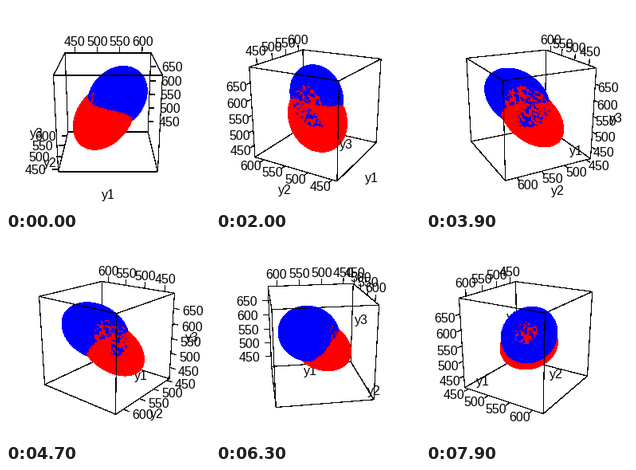
A matplotlib script for the animation above (8 s loop, 256 px wide and 256 px high).

```python
import itertools

import matplotlib.pyplot as plt
import numpy as np
from matplotlib.animation import FuncAnimation
from matplotlib.collections import LineCollection, PolyCollection

SIZE, FRAMES, STEP = 256, 80, 3.0        # pixels, frames, degrees per frame
FOCAL = SIZE / 2 / np.tan(np.radians(15))
DIST = 8.255
TILT = np.radians(20)
TICK, GAP, TITLE = 0.133, 0.28, 1.32     # in half box sides
DROP = 1.5                               # text offset in pixels
FONT = dict(family="Liberation Sans", size=16, ha="center", va="center")

fig = plt.figure(figsize=(SIZE / 72, SIZE / 72), dpi=72, facecolor="white")
ax = fig.add_axes([0, 0, 1, 1])
ax.set_xlim(0, SIZE)
ax.set_ylim(SIZE, 0)
ax.axis("off")


def rotate(p, angle):
    """Turn about the vertical axis and tilt; returns right, up, toward."""
    p = np.asarray(p, float)
    x, y, z = p[..., 0], p[..., 1], p[..., 2]
    c, s = np.cos(angle), np.sin(angle)
    right, away = c * x - s * y, s * x + c * y
    up = np.sin(TILT) * away + np.cos(TILT) * z
    toward = np.sin(TILT) * z - np.cos(TILT) * away
    return np.stack([right, up, toward], axis=-1)


def project(p, angle):
    v = rotate(p, angle)
    k = FOCAL / (DIST - v[..., 2])
    xy = np.stack([SIZE / 2 + k * v[..., 0], SIZE / 2 - k * v[..., 1]], axis=-1)
    return xy, v[..., 2]


def blob(center, spread, loose, rows=44, cols=88):
    """Quads, outward normals and looseness of an ellipsoidal mesh."""
    lat, lon = np.meshgrid(np.linspace(0, np.pi, rows + 1),
                           np.linspace(0, 2 * np.pi, cols + 1), indexing="ij")
    ball = np.stack([np.sin(lat) * np.cos(lon),
                     np.sin(lat) * np.sin(lon), np.cos(lat)], axis=-1)
    root = np.linalg.cholesky(np.array(spread))
    pts = np.array(center) + ball @ root.T
    nrm = ball @ np.linalg.inv(root)

    def quads(a):
        q = np.stack([a[:-1, :-1], a[:-1, 1:], a[1:, 1:], a[1:, :-1]], axis=2)
        return q.reshape(-1, 4, 3)

    n = quads(nrm).mean(axis=1)
    n /= np.linalg.norm(n, axis=1, keepdims=True)
    gap = np.zeros(len(n))
    for direction, limit in loose:
        d = np.array(direction) / np.linalg.norm(direction)
        gap = np.maximum(gap, n @ d > limit)
    return quads(pts), n, gap


blue = blob((0.21, 0.16, 0.20),
            [[0.43, 0.09, 0.07], [0.09, 0.42, 0.10], [0.07, 0.10, 0.40]],
            [((-1, 0, -0.1), 0.65), ((0.9, 0.3, 0.3), 0.9)])
red = blob((-0.09, -0.04, -0.17),
           [[0.44, 0.05, 0.13], [0.05, 0.45, 0.15], [0.13, 0.15, 0.40]],
           [((-1, 0, 0), 0.65)])
quads, normals, gaps = (np.concatenate(pair) for pair in zip(blue, red))
colors = np.repeat([[0, 0, 1.0], [1.0, 0, 0]], [len(blue[0]), len(red[0])], axis=0)
noise = np.random.default_rng(4).random(len(quads))

corners = np.array(list(itertools.product((-1, 1), repeat=3)))
edges = np.array([(a, b) for a, b in itertools.combinations(corners, 2)
                  if np.sum(a != b) == 1])

# without antialiasing every touched pixel is filled, so strokes stay thin
line = dict(colors="k", linewidths=0.15, antialiaseds=False)
rear = ax.add_collection(LineCollection([], zorder=1, **line))
mesh = ax.add_collection(PolyCollection([], linewidths=0, edgecolors="none",
                                        antialiaseds=False, zorder=2))
front = ax.add_collection(LineCollection([], zorder=3, **line))

# (low value, high value, middle, half range) of each axis
SCALES = [(450, 600, 523.5, 96.4), (450, 600, 531, 91), (450, 650, 553.5, 144)]
ticks = [[(v, (v - mid) / half) for v in range(lo, hi + 1, 50)]
         for lo, hi, mid, half in SCALES]
labels = [[ax.text(0, 0, str(v), zorder=4, **FONT) for v, _ in row] for row in ticks]
titles = [ax.text(0, 0, name, **FONT) for name in ("y1", "y2", "y3")]
title_pos = -TITLE * (1 - np.eye(3))


def axis_edges(angle):
    """Fixed coordinates of the box edge that carries each axis."""
    s, c = np.sin(angle), np.cos(angle)
    side = 1 if s > 0 else -1
    back = 1 if c > 0 else -1
    if angle == 0:
        y_edge = (-1, 0, -1)
    elif abs(s) < np.tan(TILT):
        y_edge = (side, 0, 1)
    else:
        y_edge = (-side, 0, -1)
    return [(0, back, 1), y_edge, (-side, back, 0)]


def draw(i):
    angle = np.radians(STEP * i)

    xy, depth = project(quads, angle)
    facing = np.clip(rotate(normals, angle)[:, 2], 0, 1)
    solid = noise >= 0.7 * gaps * facing
    order = np.argsort(depth.mean(axis=1))
    order = order[solid[order]]
    mesh.set_verts(xy[order])
    mesh.set_facecolor(colors[order])

    lines, depth = project(edges, angle)
    near = depth.mean(axis=1) > 0
    rear.set_segments(list(lines[~near]))
    marks = list(lines[near])

    for k, base in enumerate(axis_edges(angle)):
        out = np.zeros(3)
        if base[2] == 1:
            out[2] = 1
        else:
            out[0] = base[0]
        shift = 12.5 * rotate(out, angle)[0]
        for (_, pos), text in zip(ticks[k], labels[k]):
            p = np.array(base, float)
            p[k] = pos
            pts, _ = project([p, p + TICK * out, p + GAP * out], angle)
            marks.append(pts[:2])
            text.set_position((pts[2, 0] + shift, pts[2, 1] + DROP))
    front.set_segments(marks)

    spots, depth = project(title_pos, angle)
    for text, (x, y), d in zip(titles, spots, depth):
        text.set_position((x, y + DROP))
        text.set_zorder(4 if d > 0 else 1.5)
    return [rear, mesh, front, *titles, *itertools.chain(*labels)]


anim = FuncAnimation(fig, draw, frames=FRAMES, interval=100, repeat=True,
                     repeat_delay=0, blit=False)
plt.show()
```
